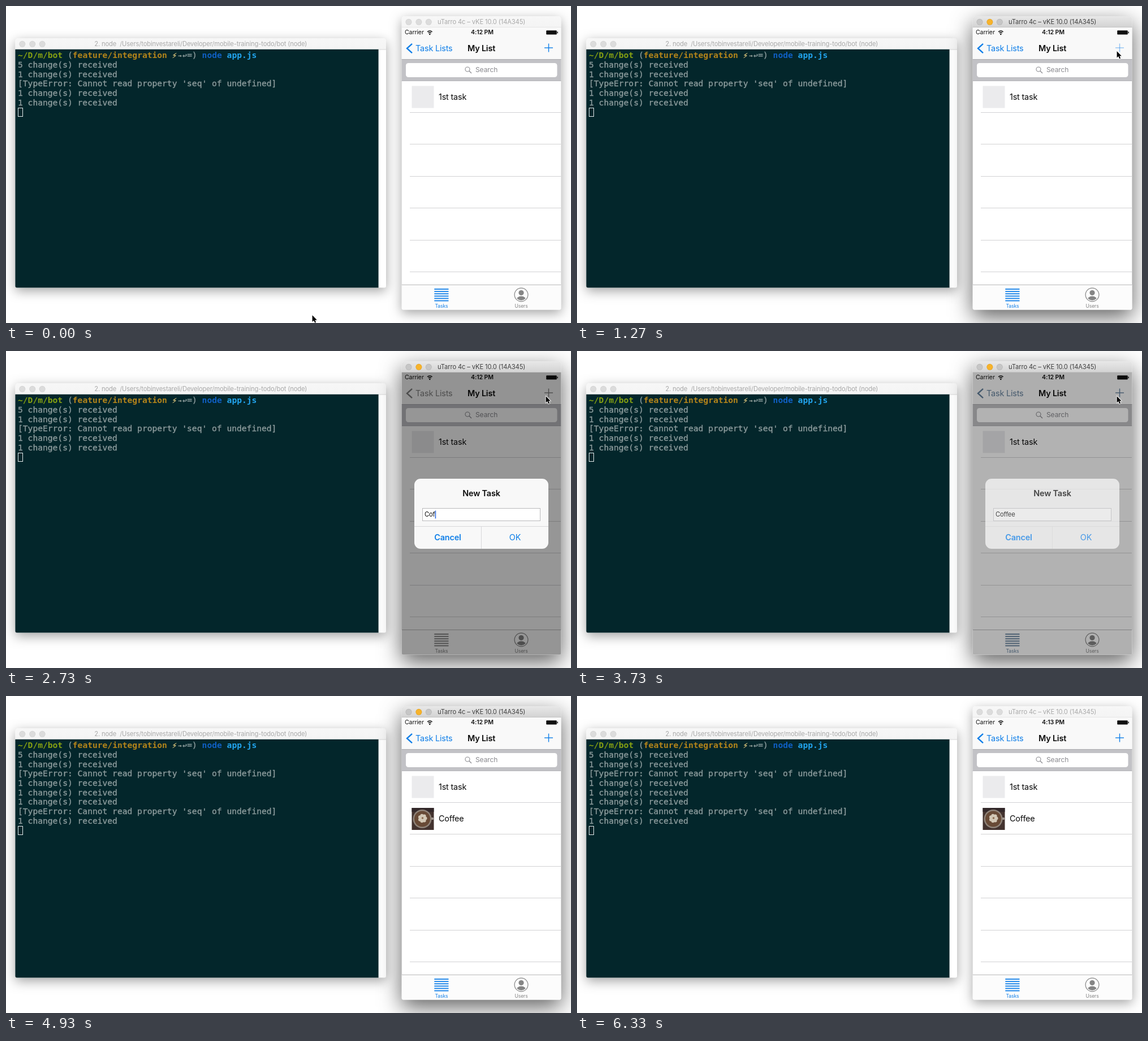
Recreate the animation shown at these times as an HTML page with a canvas. Size 999 by 561 pixels, loop 6.39 s.

```html
<!DOCTYPE html>
<html lang="en">
<head>
<meta charset="utf-8">
<title>Todo bot demo</title>
<style>
html, body { margin: 0; width: 100%; height: 100%; overflow: hidden; background: #fff; }
canvas { display: block; }
</style>
</head>
<body>
<canvas id="stage" width="999" height="561"></canvas>
<script>
const ctx = document.getElementById('stage').getContext('2d');
const LOOP = 6390;
const SANS = 'Inter, "Liberation Sans", sans-serif';
const MONO = '"DejaVu Sans Mono", monospace';
const ACTIVE = [1200, 5800], SHOW = [1420, 1820], HIDE = [3610, 3970];
const KEYS = [2400, 2540, 2680, 2840, 3010, 3160];
const PHONE = { x: 699.7, y: 18, w: 281.7, h: 519.5 };

const ease = (t, [from, to]) => {
  const x = Math.min(1, Math.max(0, (t - from) / (to - from)));
  return x * x * (3 - 2 * x);
};
const mix = (a, b, p) => a + (b - a) * p;

function rect(x, y, w, h, fill, r = 0) {
  ctx.fillStyle = fill;
  ctx.beginPath();
  ctx.roundRect(x, y, w, h, r);
  ctx.fill();
}

function disc(x, y, r, fill) {
  ctx.fillStyle = fill;
  ctx.beginPath();
  ctx.arc(x, y, r, 0, 7);
  ctx.fill();
}

function line(color, width, ...points) {
  ctx.strokeStyle = color;
  ctx.lineWidth = width;
  ctx.beginPath();
  points.forEach(([x, y]) => ctx.lineTo(x, y));
  ctx.stroke();
}

function arc(x, y, r, from, to, color, width) {
  ctx.strokeStyle = color;
  ctx.lineWidth = width;
  ctx.beginPath();
  ctx.arc(x, y, r, from, to);
  ctx.stroke();
}

function text(str, x, y, size, color, { align = 'left', weight = 400, font = SANS, stroke = 0 } = {}) {
  ctx.font = `${weight} ${size}px ${font}`;
  ctx.letterSpacing = font === SANS ? `${-0.012 * size}px` : '0px';
  ctx.textAlign = align;
  ctx.fillStyle = ctx.strokeStyle = color;
  ctx.fillText(str, x, y);
  if (stroke) {
    ctx.lineWidth = stroke;
    ctx.strokeText(str, x, y);
  }
}

function windowFrame({ x, y, w, h }, title, active) {
  ctx.save();
  ctx.shadowColor = `rgba(0,0,0,${active ? 0.62 : 0.36})`;
  ctx.shadowBlur = active ? 38 : 20;
  ctx.shadowOffsetY = active ? 13 : 6;
  rect(x, y, w, h, '#fff', [5, 5, 3, 3]);
  ctx.restore();
  const bar = ctx.createLinearGradient(0, y, 0, y + 20);
  bar.addColorStop(0, active ? '#e8e8e8' : '#f7f7f7');
  bar.addColorStop(1, active ? '#d2d2d2' : '#f4f4f4');
  rect(x, y, w, 20, bar, [5, 5, 0, 0]);
  line(active ? '#b4b4b4' : '#d6d6d6', 1, [x, y + 20], [x + w, y + 20]);
  [12.3, 30.2, 47.6].forEach((dx, i) => {
    const lit = active && i === 1;
    disc(x + dx, y + 10.3, 5.5, lit ? '#e0a020' : active ? '#b4b4b4' : '#d0d0d0');
    disc(x + dx, y + 10.3, 4.8, lit ? '#f7b32b' : active ? '#c6c6c6' : '#dcdcdc');
  });
  text(title, x + w / 2, y + 11, 11.2, active ? '#404040' : '#a9a9a9', { align: 'center' });
}

function terminal(t) {
  const left = 21, top = 88.6, colWidth = 8.8, rowHeight = 16.68;
  const put = (str, col, row, color = '#8c9b9c', weight = 400, size = 14.62) =>
    text(str, left + col * colWidth, top + row * rowHeight, size, color,
      { weight, font: MONO, stroke: weight === 400 ? 0.35 : 0 });

  windowFrame({ x: 16.5, y: 57, w: 655.5, h: 441.5 },
    '2. node  /Users/tobinvestareli/Developer/mobile-training-todo/bot (node)', false);
  rect(16.4, 76.8, 642.2, 421.8, '#03262b', [0, 0, 0, 3]);

  put('~/D/m/bot', 0, 0, '#86a012', 700);
  put('(', 10, 0);
  put('feature/integration', 11, 0, '#b5851a', 700);
  put('\u26A1\uFE0E', 31, 0, '#e8cf80', 400, 14);
  put('\u2192', 32.2, 0, '#a0a8a0', 400, 10);
  put('\u21A9', 33.1, 0, '#8c9b9c', 400, 13);
  put('=)', 34, 0);
  put('node', 37, 0, '#0f5fc4', 700);
  put('app.js', 42, 0, '#22a4ee', 700);

  const one = '1 change(s) received';
  const error = "[TypeError: Cannot read property 'seq' of undefined]";
  const log = ['5 change(s) received', one, error, one, one];
  if (t >= 4300) log.push(one);
  if (t >= 4400) log.push(error);
  if (t >= 4600) log.push(one);
  log.forEach((str, i) => put(str, 0, i + 1));
  ctx.strokeStyle = '#e4eaea';
  ctx.lineWidth = 1;
  ctx.strokeRect(21.5, Math.round(top + (log.length + 1) * rowHeight - 8.9) + 0.5, 8, 15);
}

function coffeePhoto(x, y) {
  rect(x, y, 39, 39, '#43332f');
  rect(x, y, 39, 7, '#33282a');
  rect(x + 32, y + 17, 7, 4, '#a39a92', 2);
  disc(x + 18.5, y + 19.5, 16.5, '#8f8379');
  disc(x + 18.5, y + 19.5, 14, '#684a36');
  for (let i = 0; i < 7; i++) {
    const a = i * Math.PI * 2 / 7;
    disc(x + 19 + 5 * Math.cos(a), y + 18.5 + 5 * Math.sin(a), 3, '#d3c8b6');
  }
  disc(x + 19, y + 18.5, 5, '#d3c8b6');
  disc(x + 19, y + 18, 1.8, '#8d6c50');
}

function phone(t) {
  const shown = ease(t, SHOW) * (1 - ease(t, HIDE));
  const tint = `rgb(${mix(14, 128, shown)},${mix(126, 128, shown)},${mix(232, 128, shown)})`;
  const { x, w } = PHONE, right = x + w, bottom = PHONE.y + PHONE.h;
  windowFrame(PHONE, 'uTarro 4c – vKE 10.0 (14A345)', t >= ACTIVE[0] && t < ACTIVE[1]);

  // Status and navigation bars
  rect(x, 38, w, 56, '#f9f9f9');
  text('Carrier', 705, 47.3, 10.6, '#111');
  disc(749.3, 50, 1.3, '#111');
  [3.6, 6.4].forEach(r => arc(749.3, 50.5, r, -2.3, -0.84, '#111', 1.6));
  text(t < 5500 ? '4:12 PM' : '4:13 PM', 842, 47.3, 10.6, '#111', { align: 'center', weight: 600 });
  rect(955.2, 43.2, 18.6, 7.2, '#111', 1.2);
  rect(974.4, 45.2, 1.5, 3.2, '#111', 1);
  line(tint, 2.4, [718, 66.8], [709, 75], [718, 83.2]);
  text('Task Lists', 724, 75.5, 14.4, tint);
  text('My List', 840.5, 75.5, 14.4, '#0a0a0a', { align: 'center', weight: 600 });
  ctx.globalAlpha = t >= ACTIVE[0] && t < SHOW[0] ? 0.45 : 1;
  line(tint, 1.4, [952, 74], [967, 74]);
  line(tint, 1.4, [959.5, 66.5], [959.5, 81.5]);
  ctx.globalAlpha = 1;

  // Search bar
  rect(x, 94, w, 39, '#c2c2c6');
  line('#acacb0', 1, [x, 94.5], [right, 94.5]);
  line('#b6b6ba', 1, [x, 132.5], [right, 132.5]);
  rect(707, 101, 267.5, 25, '#fff', 4.5);
  arc(816, 112, 4, 0, 7, '#8a8a8f', 1.1);
  line('#8a8a8f', 1.2, [819, 115], [823, 119]);
  text('Search', 830, 113.7, 12.1, '#8a8a8f');

  // Task list
  for (let i = 0; i < 6; i++) {
    const y = Math.round(188 + i * 56.4) + 0.5;
    line('#d2d2d4', 1, [714, y], [right, y]);
  }
  rect(717.5, 141.5, 39, 39, '#ebebed');
  text('1st task', 765, 161.5, 14.4, '#0a0a0a');
  if (t >= 4230) {
    if (t >= 4600) coffeePhoto(717.5, 198);
    else rect(717.5, 198, 39, 39, '#ebebed');
    text('Coffee', 765, 218, 14.4, '#0a0a0a');
  }

  // Tab bar
  rect(x, 493, w, bottom - 493, '#fcfcfc', [0, 0, 3, 3]);
  line('#b8b8ba', 1, [x, 493.5], [right, 493.5]);
  for (let i = 0; i < 6; i++) rect(757.3, 500.2 + i * 4.1, 25.2, 1.8, tint);
  text('Tasks', 770, 531.5, 8.6, tint, { align: 'center' });
  arc(911, 511, 11.9, 0, 7, '#858585', 1.2);
  ctx.save();
  ctx.beginPath();
  ctx.arc(911, 511, 10, 0, 7);
  ctx.clip();
  disc(911, 507.5, 4.6, '#858585');
  ctx.fillStyle = '#858585';
  ctx.beginPath();
  ctx.ellipse(911, 521, 9, 7.5, 0, 0, 7);
  ctx.fill();
  ctx.restore();
  text('Users', 911, 531.5, 8.6, '#858585', { align: 'center' });

  if (shown > 0) {
    rect(x, 38, w, bottom - 38, `rgba(0,0,0,${0.41 * shown})`, [0, 0, 3, 3]);
    alertBox(t, shown);
  }
}

function alertBox(t, shown) {
  const scale = 1.2 - 0.2 * ease(t, SHOW);
  const blue = '#0e7ee8';
  ctx.save();
  ctx.translate(840.5, 288);
  ctx.scale(scale, scale);
  ctx.translate(-840.5, -288);
  ctx.globalAlpha = shown;
  // The panel leaves a hole for the field so both fade evenly
  ctx.fillStyle = '#f8f8f8';
  ctx.beginPath();
  ctx.roundRect(722, 226, 237, 124, 11);
  ctx.rect(736, 278, 209, 23);
  ctx.fill('evenodd');
  rect(736, 278, 209, 23, '#fff');
  ctx.strokeStyle = '#b9b9bb';
  ctx.lineWidth = 1;
  ctx.strokeRect(736.5, 278.5, 208, 22);
  text('New Task', 840.5, 252.7, 14.4, '#0a0a0a', { align: 'center', weight: 600 });
  const typed = 'Coffee'.slice(0, KEYS.filter(k => t >= k).length);
  text(typed, 740, 290, 11.2, '#0a0a0a');
  if (t < HIDE[0]) rect(740 + ctx.measureText(typed).width, 282.5, 1.6, 14, '#2f6be0');
  line('#d8d8da', 1, [722, 310.5], [959, 310.5]);
  line('#d8d8da', 1, [840.5, 311], [840.5, 350]);
  text('Cancel', 781, 330.8, 14.4, blue, { align: 'center', weight: 600 });
  text('OK', 900, 330.8, 14.4, blue, { align: 'center' });
  ctx.restore();
}

function pointer(t) {
  if (t >= 4400) return;
  const p = ease(t, [100, 1050]);
  ctx.save();
  ctx.translate(mix(541.6, 954.6, p), mix(547.3, 80, p));
  const arrow = new Path2D('M0 0V11.6L2.7 9.1L4.5 13.3L6.5 12.4L4.7 8.4H8.2Z');
  ctx.lineJoin = 'round';
  ctx.strokeStyle = '#fff';
  ctx.lineWidth = 1.8;
  ctx.stroke(arrow);
  ctx.fillStyle = '#000';
  ctx.fill(arrow);
  ctx.restore();
}

function draw(now) {
  const t = now % LOOP;
  ctx.textBaseline = 'middle';
  rect(0, 0, 999, 561, '#fff');
  terminal(t);
  phone(t);
  pointer(t);
  requestAnimationFrame(draw);
}
requestAnimationFrame(draw);
</script>
</body>
</html>
```
